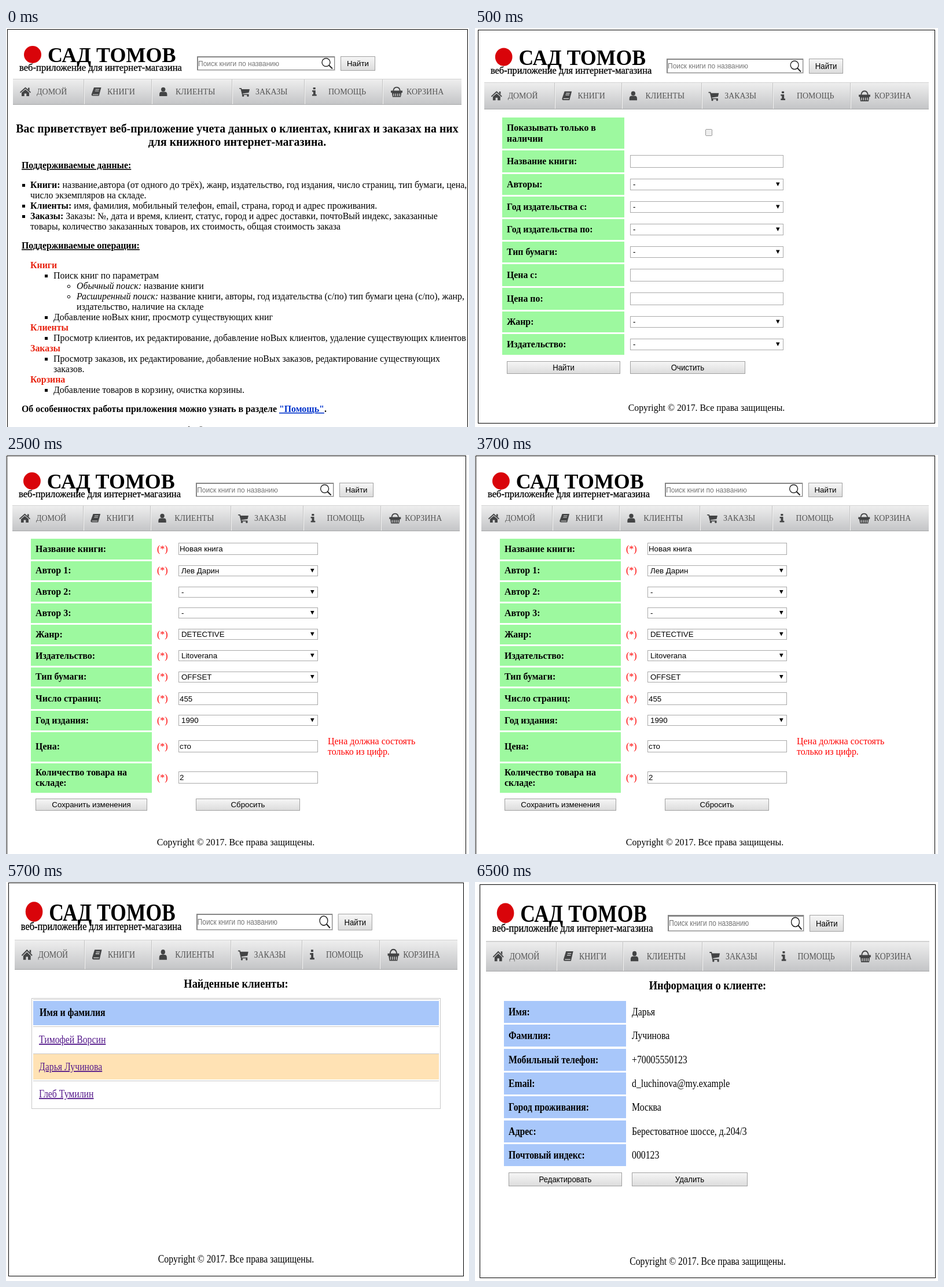
An HTML page for the animation above (8 s loop, 800 by 691 pixels).

```html
<!DOCTYPE html>
<html lang="ru">
<head>
<meta charset="utf-8">
<title>Книжный интернет-магазин</title>
<style>
html, body { margin: 0; width: 100%; height: 100%; overflow: hidden; background: #fff; }
#stage { width: 800px; height: 691px; overflow: hidden; }
#strip { animation: pages 8s step-end infinite; }
#strip svg { display: block; width: 800px; height: 691px; overflow: hidden; }
@keyframes pages {
  0% { transform: translateY(0); }
  6.25% { transform: translateY(-691px); }
  31.25% { transform: translateY(-1382px); }
  56.25% { transform: translateY(-2073px); }
  81.25%, 100% { transform: translateY(-2764px); }
}
text { font-family: "Liberation Serif", serif; fill: #000; }
rect { shape-rendering: crispEdges; vector-effect: non-scaling-stroke; }
.b { font-weight: bold; }
.i { font-style: italic; }
.m { text-anchor: middle; }
.s { font-family: "Liberation Sans", sans-serif; }
.u { text-decoration: underline; }
.red { fill: #f00; }
.topic { fill: #e8220f; font-weight: bold; }
.link { fill: #0033cc; text-decoration: underline; }
.seen { fill: #551a8b; text-decoration: underline; }
.nav { fill: #555; }
.hint { fill: #757575; }
.icon { fill: #434445; }
</style>
</head>
<body>
<div id="stage"><div id="strip"></div></div>
<script>
const GREEN = '#9df99f', BLUE = '#a8c7fa';
let sx = 1, sy = 1;

const text = (x, y, str, cls = '', size = 16) =>
  `<text class="${cls}" font-size="${size}" transform="translate(${x} ${y}) scale(${sx} ${sy})">${str}</text>`;
const fill = (x, y, x2, y2, color) =>
  `<rect x="${x}" y="${y}" width="${x2 - x}" height="${y2 - y}" fill="${color}"/>`;
const box = (x, y, x2, y2, color, line) =>
  `<rect x="${x + .5}" y="${y + .5}" width="${x2 - x - 1}" height="${y2 - y - 1}" fill="${color}" stroke="${line}"/>`;
const shape = (d, attrs = '') => `<path d="${d}" ${attrs}/>`;
const bold = str => `<tspan class="b">${str}</tspan>`;
const ital = str => `<tspan class="i">${str}</tspan>`;

const button = (x, y, x2, y2, str) =>
  box(x, y, x2, y2, 'url(#btn)', '#a0a0a0') +
  text((x + x2) / 2, (y + y2) / 2 + 4.7 * sy, str, 's m', 13.333);

const field = (x, y, x2, y2, str = '') =>
  box(x, y, x2, y2, '#fff', '#a9a9a9') +
  text(x + 2, (y + y2) / 2 + 4.7 * sy, str, 's', 13.333);

const select = (x, y, x2, y2, str = '-') => {
  const c = (y + y2) / 2;
  return box(x, y, x2, y2, '#fff', '#a9a9a9') +
    text(x + 5, c + 4.7 * sy, str, 's', 13.333) +
    shape(`M${x2 - 13} ${c - 3.5}h6.6l-3.3 6.5z`);
};

const heading = (x, y, str) => text(x, y, str, 'b m', 18.72);
const footer = (x, y) => text(x, y, 'Copyright © 2017. Все права защищены.', 'm');

const icons = () => `<g class="icon">` +
  shape('M24 111L33.5 102.6L43 111L42 112.4L33.5 105L25 112.4ZM38 103.4h2.6v5l-2.6-2.2ZM27 112L33.5 106.6L40 112V118H35.3V113.6H31.7V118H27Z') +
  shape('M152 103H164.5L160.6 117.6H150Q146.8 117.4 148 114Z') +
  shape('M154.5 106.3h6.5M153.7 109h6.5M150 115.2H159.5', 'stroke="#ddd" stroke-width="1.1"') +
  '<circle cx="271.7" cy="106.5" r="3.7"/>' +
  shape('M265 118V115Q265 110.6 269 110.6H274.4Q278.4 110.6 278.4 115V118Z') +
  shape('M403 104h3.8l.6 2H421L419.5 112L409 113.4l.3 1.2H419.5v1.4H408L405.4 105.6H403Z') +
  '<circle cx="409.6" cy="117.3" r="1.7"/><circle cx="418" cy="117.3" r="1.7"/>' +
  shape('M530.7 103h4v3.2h-4ZM529 108h5.8v7h1.9v2.6h-7.7v-2.6h1.9v-4.4h-1.9Z') +
  shape('M669 110Q669.5 102.6 675 102.6T681 110', 'fill="none" stroke="#434445" stroke-width="1.8"') +
  shape('M665 108.6H685V112H665ZM666.6 112H683.4L682 119.5H668Z') +
  shape('M670 113.4v4.6M673.4 113.4v4.6M676.8 113.4v4.6M680.2 113.4v4.6', 'stroke="#ddd" stroke-width="1.3"') +
  '</g>';

const menu = [[53, 'ДОМОЙ'], [175, 'КНИГИ'], [293, 'КЛИЕНТЫ'], [431, 'ЗАКАЗЫ'], [557, 'ПОМОЩЬ'], [692, 'КОРЗИНА']];

const header = () =>
  '<circle cx="46" cy="46" r="15" fill="#d9040a"/>' +
  text(72, 59, 'САД ТОМОВ', 'b', 36) +
  `<g stroke="#000" stroke-width=".3">${text(23, 73.5, 'веб-приложение для интернет-магазина', '', 16.6)}</g>` +
  fill(330, 49, 569, 74, '#d8d8d8') + fill(330, 49, 568, 73, '#858585') + fill(332, 51, 567, 72, '#fff') +
  text(332, 65.5, 'Поиск книги по названию', 's hint', 12) +
  '<circle cx="553" cy="59.5" r="7" fill="none" stroke="#222" stroke-width="1.4"/>' +
  shape('M558 64.5L564 70.5', 'stroke="#222" stroke-width="2"') +
  button(578, 49, 638, 74, 'Найти') +
  fill(12, 88, 787, 133, 'url(#bar)') + fill(12, 88, 787, 89, '#d2d2d2') + fill(12, 132, 787, 133, '#a6a7a8') +
  [135, 252, 391, 516, 651].map(x => fill(x - 1, 89, x, 132, '#c3c3c3') + fill(x, 89, x + 1, 132, '#f2f2f2')).join('') +
  icons() +
  menu.map(([x, s]) => text(x, 115, s, 'nav', 14)).join('');

// Each page has its own outer frame, header scale and text scale.
function page(scaleX, scaleY, left, top, frame, body, textScale = scaleX) {
  sx = textScale; sy = scaleY;
  return `<svg viewBox="0 0 800 691">${box(...frame, '#fff', '#000')}` +
    `<use href="#header" transform="translate(${left - 12 * scaleX} ${top - 88 * scaleY}) scale(${scaleX} ${scaleY})"/>` +
    `${body()}</svg>`;
}

function home() {
  const lines = [
    [42, 277, bold('Книги:') + ' название,автора (от одного до трёх), жанр, издательство, год издания, число страниц, тип бумаги, цена,'],
    [42, 295, 'число экземпляров на складе.'],
    [42, 313, bold('Клиенты:') + ' имя, фамилия, мобильный телефон, email, страна, город и адрес проживания.'],
    [42, 331, bold('Заказы:') + ' Заказы: №, дата и время, клиент, статус, город и адрес доставки, почтоВый индекс, заказанные'],
    [42, 349, 'товары, количество заказанных товаров, их стоимость, общая стоимость заказа'],
    [42, 416, 'Книги', 'topic'],
    [82, 434, 'Поиск книг по параметрам'],
    [122, 452, ital('Обычный поиск:') + ' название книги'],
    [122, 470, ital('Расширенный поиск:') + ' название книги, авторы, год издательства (с/по) тип бумаги цена (с/по), жанр,'],
    [122, 488, 'издательство, наличие на складе'],
    [82, 506, 'Добавление ноВых книг, просмотр существующих книг'],
    [42, 524, 'Клиенты', 'topic'],
    [82, 542, 'Просмотр клиентов, их редактирование, добавление ноВых клиентов, удаление существующих клиентов'],
    [42, 560, 'Заказы', 'topic'],
    [82, 578, 'Просмотр заказов, их редактирование, добавление ноВых заказов, редактирование существующих'],
    [82, 596, 'заказов.'],
    [42, 614, 'Корзина', 'topic'],
    [82, 632, 'Добавление товаров в корзину, очистка корзины.'],
    [27, 243, 'Поддерживаемые данные:', 'b u'],
    [27, 382, 'Поддерживаемые операции:', 'b u'],
    [27, 665, 'Об особенностях работы приложения можно узнать в разделе <tspan class="link">"Помощь"</tspan>.', 'b']
  ];
  const dot = x => y => fill(x, y - 7, x + 5, y - 2, '#000');
  const ring = y => `<circle cx="108.5" cy="${y - 4.5}" r="2.3" fill="none" stroke="#000"/>`;
  return text(399.5, 181, 'Вас приветствует веб-приложение учета данных о клиентах, книгах и заказах на них', 'b m', 20) +
    text(399.5, 204, 'для книжного интернет-магазина.', 'b m', 20) +
    lines.map(l => text(...l)).join('') +
    [277, 313, 331].map(dot(28)).join('') +
    [434, 506, 542, 578, 632].map(dot(67)).join('') +
    [452, 470].map(ring).join('') +
    footer(398, 702);
}

function search() {
  const rows = [
    [212, 250, 'Название книги:', field, 220, 242],
    [253, 289, 'Авторы:', select, 261, 281],
    [292, 328, 'Год издательства с:', select, 300, 320],
    [331, 367, 'Год издательства по:', select, 339, 359],
    [370, 406, 'Тип бумаги:', select, 378, 398],
    [409, 447, 'Цена с:', field, 417, 439],
    [450, 488, 'Цена по:', field, 458, 480],
    [491, 527, 'Жанр:', select, 499, 519],
    [530, 566, 'Издательство:', select, 538, 558]
  ];
  return fill(47, 155, 258, 209, GREEN) +
    text(55, 178, 'Показывать только в', 'b') + text(55, 196.5, 'наличии', 'b') +
    '<rect x="398.5" y="175.5" width="11" height="11" rx="2" fill="#eee" stroke="#999"/>' +
    rows.map(([y, y2, label, control, top, end]) =>
      fill(47, y, 258, y2, GREEN) + text(55, (y + y2) / 2 + 5, label, 'b') + control(268, top, 533, end)).join('') +
    button(55, 577, 251, 599, 'Найти') + button(268, 577, 467, 599, 'Очистить') +
    footer(400, 663);
}

function edit() {
  const rows = [
    [145, 181, 'Название книги:', field, 152, 173, 'Новая книга'],
    [184, 217, 'Автор 1:', select, 191, 210, 'Лев Дарин'],
    [220, 254, 'Автор 2:', select, 228, 247, '-'],
    [257, 291, 'Автор 3:', select, 264, 283, '-'],
    [294, 328, 'Жанр:', select, 301, 320, 'DETECTIVE'],
    [331, 365, 'Издательство:', select, 338, 357, 'Litoverana'],
    [368, 401, 'Тип бумаги:', select, 375, 394, 'OFFSET'],
    [404, 440, 'Число страниц:', field, 411, 433, '455'],
    [443, 477, 'Год издания:', select, 450, 469, '1990'],
    [480, 531, 'Цена:', field, 494, 515, 'сто'],
    [534, 585, '', field, 548, 569, '2']
  ];
  return rows.map(([y, y2, label, control, top, end, value]) => {
    const base = (y + y2) / 2 + 4.7;
    return fill(43, y, 252, y2, GREEN) + text(51, base, label, 'b') +
      (value === '-' ? '' : text(261, base, '(*)', 'red')) +
      control(298, top, 539, end, value);
  }).join('') +
    text(51, 555, 'Количество товара на', 'b') + text(51, 573, 'складе:', 'b') +
    text(556, 501, 'Цена должна состоять', 'red') + text(556, 519, 'только из цифр.', 'red') +
    button(51, 595, 244, 616, 'Сохранить изменения') + button(328, 595, 508, 616, 'Сбросить') +
    footer(397, 676);
}

function clients() {
  return heading(397.5, 183, 'Найденные клиенты:') +
    box(44, 201, 751, 393, '#fff', '#c8c8c8') +
    fill(47, 203, 748, 204, '#d0d0d0') +
    fill(47, 206, 748, 248, BLUE) + fill(47, 298, 748, 342, '#ffe2b4') +
    [250, 297, 344].map(y => fill(47, y, 748, y + 1, '#c8c8c8')).join('') +
    text(58, 232, 'Имя и фамилия', 'b') +
    ['Тимофей Ворсин', 'Дарья Лучинова', 'Глеб Тумилин'].map((s, i) => text(57, 279 + 47 * i, s, 'seen')).join('') +
    footer(397.5, 659);
}

function card() {
  const rows = [
    ['Имя:', 'Дарья'],
    ['Фамилия:', 'Лучинова'],
    ['Мобильный телефон:', '+70005550123'],
    ['Email:', 'd_luchinova@my.example'],
    ['Город проживания:', 'Москва'],
    ['Адрес:', 'Берестоватное шоссе, д.204/3'],
    ['Почтовый индекс:', '000123']
  ];
  return heading(402, 186, 'Информация о клиенте:') +
    rows.map(([label, value], i) => {
      const y = Math.round(206 + 41.3 * i);
      return fill(50, y, 261, y + 38, BLUE) + text(58, y + 24.7, label, 'b') + text(271, y + 24.7, value);
    }).join('') +
    button(58, 503, 254, 527, 'Редактировать') + button(271, 503, 471, 527, 'Удалить') +
    footer(402, 663);
}

const gradient = (id, from, to) =>
  `<linearGradient id="${id}" x1="0" y1="0" x2="0" y2="1"><stop stop-color="${from}"/><stop offset="1" stop-color="${to}"/></linearGradient>`;

const defs = `<svg style="position:absolute;width:0;height:0"><defs>` +
  gradient('bar', '#efefef', '#c3c4c6') + gradient('btn', '#f6f6f6', '#dcdcdc') +
  `<g id="header">${header()}</g></defs></svg>`;

document.getElementById('strip').innerHTML = defs +
  page(1, 1, 12, 88, [2, 2, 798, 720], home, .993) +
  page(.991, 1.045, 16, 94, [5, 3, 795, 685], search) +
  page(.9974, 1, 11, 87, [1, 1, 795, 720], edit) +
  page(.987, 1.155, 15, 100, [4, 1, 791, 683], clients) +
  page(.988, 1.16, 19, 102.5, [8, 4, 796, 686], card);
</script>
</body>
</html>
```
